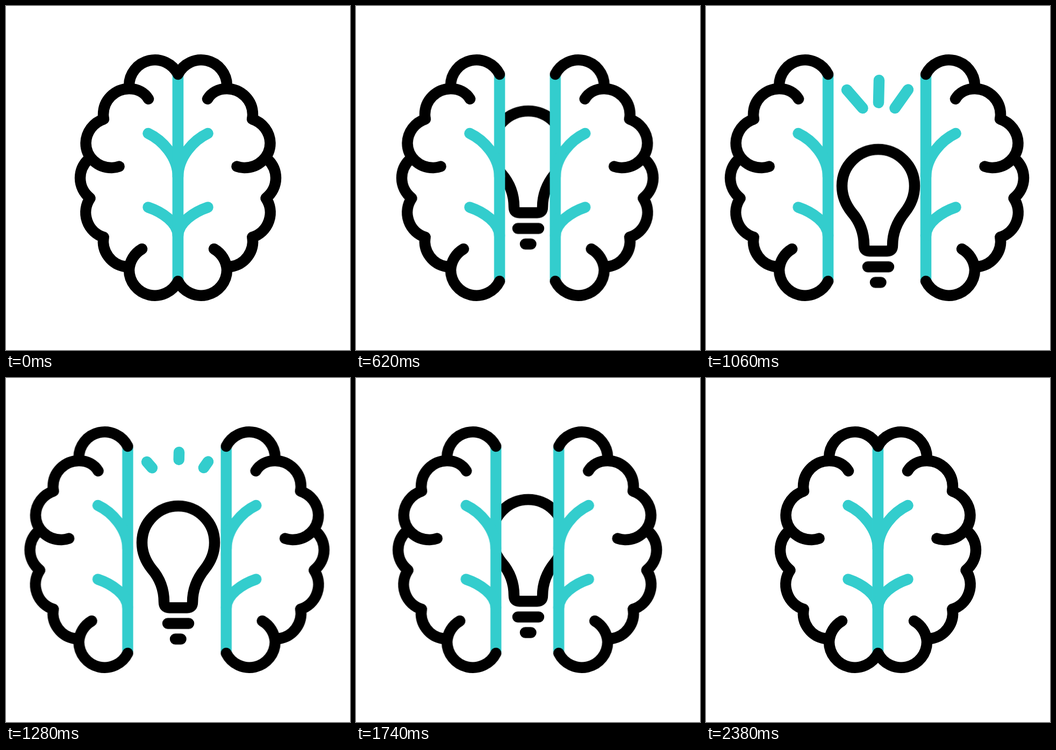
Animation, 640 px wide and 640 px high, one loop 2400 ms. Source, as an HTML page:

```html
<!DOCTYPE html>
<html lang="en">
<head>
<meta charset="utf-8">
<title>Brain and light bulb</title>
<style>
  html, body { margin: 0; width: 100%; height: 100%; overflow: hidden; background: #fff; }
  svg { display: block; width: 100%; height: 100%; }
  path { fill: none; stroke: #000; stroke-width: 20.5; stroke-linecap: round; stroke-linejoin: round; }
  .teal { stroke: #33cdcd; }
  .stem { stroke-linecap: butt; }
  #rays path { stroke-dasharray: 1 3; }
</style>
</head>
<body>
<svg viewBox="0 0 640 640">
  <defs>
    <g id="half">
      <!-- white backing hides the bulb outside the gap -->
      <rect x="0" y="80" width="320" height="480" fill="#fff"/>
      <path class="teal stem" d="M320 127V512"/>
      <path class="teal" d="M264.500 237C290 249 320 280 320 318M264.500 374.500C290 383 320 403 320 428"/>
      <path d="M320 127A48 48 0 0 0 229 148"/>
      <path d="M265 173C258 161 245 154 229 154A48 48 0 0 0 181 202Q181 206 182 210.500A48 48 0 0 0 148.500 255A48 46 0 0 0 197 301Q204 301 210.500 298.500"/>
      <path d="M152 286.500A48 48 0 0 0 138 320A48 48 0 0 0 156.500 357.500A48 48 0 0 0 181.500 430"/>
      <path d="M181.500 430A48 48 0 0 0 222 485"/>
      <path d="M320 512A48 48 0 0 1 229 491A48 48 0 0 1 253 452"/>
    </g>
  </defs>
  <g id="bulb">
    <path d="M320.500 267C357 267 388 297 388 335C388 353 381 370 370 384C357 400 347 420 347 446Q347 456.300 337 456.300H304Q294 456.300 294 446C294 420 285 400 271 384C260 370 253 353 253 335C253 297 284 267 320.500 267Z"/>
    <path d="M301 485.500H340M315 514.500H325.500"/>
  </g>
  <g id="rays">
    <path class="teal" pathLength="1" d="M291.500 190L262 156"/>
    <path class="teal" pathLength="1" d="M321 180L322 138"/>
    <path class="teal" pathLength="1" d="M351.500 190L376 155.500"/>
  </g>
  <g id="left"><use href="#half"/></g>
  <g id="right"><use href="#half" transform="matrix(-1 0 0 1 640 0)"/></g>
</svg>
<script>
const LOOP = 2400;
const OPEN = "cubic-bezier(.73,0,.27,1)";
const CLOSE = "cubic-bezier(.755,0,.2,1)";
const SINE = "cubic-bezier(.37,0,.63,1)";

// steps: [time in ms, value, easing towards the next step]
function play(el, prop, steps, format = v => v) {
  const frames = steps.map(([t, v, easing = "linear"]) =>
    ({ offset: t / LOOP, [prop]: format(v), easing }));
  el.animate(frames, { duration: LOOP, iterations: Infinity });
}

const get = id => document.getElementById(id);
const moveX = v => `translate(${v}px, 0px)`;
const moveY = v => `translate(0px, ${v}px)`;

for (const [id, far] of [["left", -93.8], ["right", 90]])
  play(get(id), "transform", [[0, 0, OPEN], [1200, far, CLOSE], [2400, 0]], moveX);

play(get("bulb"), "transform", [
  [0, 0], [120, 0, SINE], [600, -72, SINE], [1080, 0, SINE],
  [1540, -72, SINE], [1980, 0], [2400, 0]
], moveY);

play(get("rays"), "opacity", [[0, 0, "step-end"], [860, 1, "step-end"], [1320, 0, "step-end"], [2400, 0]]);
for (const ray of get("rays").children)
  play(ray, "strokeDashoffset", [
    [0, 1], [860, 1, "ease-out"], [1040, 0], [1140, 0, "ease-in"], [1320, -1], [2400, -1]
  ]);
</script>
</body>
</html>
```
